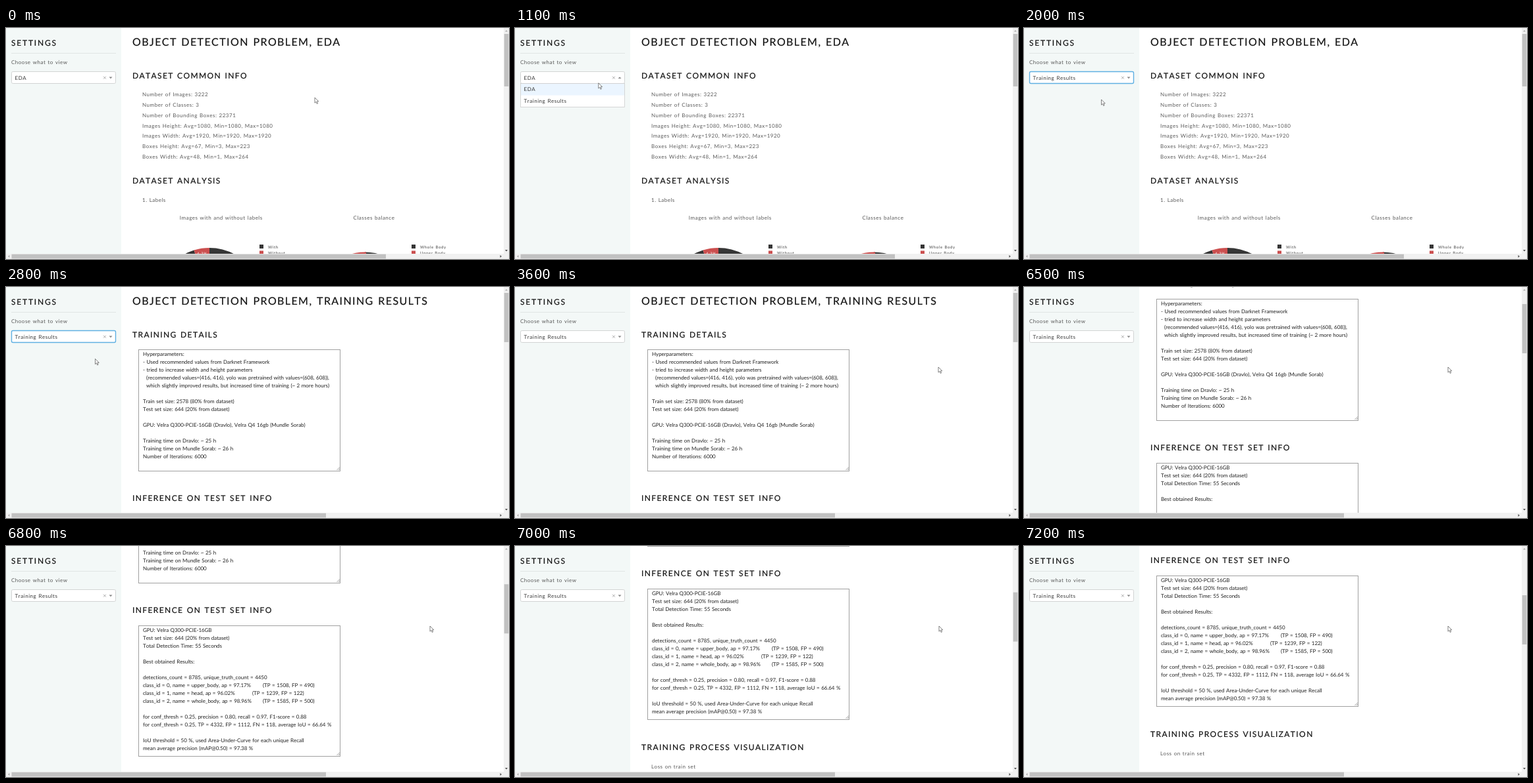
Animation of 764 by 352 pixels, one loop 8000 ms. Source, as an HTML page:

```html
<!DOCTYPE html>
<html lang="en">
<head>
<meta charset="utf-8">
<title>Object detection dashboard</title>
<style>
  html, body { margin: 0; width: 100%; height: 100%; overflow: hidden; background: #fff; }
  svg { display: block; }
  text {
    font: 8px Lato, "Open Sans", sans-serif;
    white-space: pre;
    text-rendering: geometricPrecision;
    font-kerning: none;
    word-spacing: .07em;
  }
  .h1, .h2 { fill: #141414; stroke: #141414; stroke-width: .2px; }
  .h1 { font-size: 16px; letter-spacing: 1.41px; }
  .h2 { font-size: 12px; letter-spacing: 1.4px; }
  .side { letter-spacing: 1.8px; }
  .body { letter-spacing: .5px; fill: #5a5a5a; }
  .value { letter-spacing: .53px; fill: #383838; }
  .legend { font-size: 6px; letter-spacing: .65px; fill: #444; }
  .area { letter-spacing: -.05px; fill: #222; }
  .mid { text-anchor: middle; }
</style>
</head>
<body>
<svg id="stage" width="764" height="352" viewBox="0 0 764 352"></svg>
<script>
const DURATION = 8000, STEP = 100;
const DARK = '#363636', RED = '#cb4f4f';

const text = (cls, x, y, str) => `<text class="${cls}" x="${x}" y="${y}">${str}</text>`;
const rect = (x, y, w, h, fill, extra = '') =>
  `<rect x="${x}" y="${y}" width="${w}" height="${h}" fill="${fill}" ${extra}/>`;
const path = (d, fill, extra = '') => `<path d="${d}" fill="${fill}" ${extra}/>`;
const lines = (cls, x, y, pitch, list) =>
  list.map((str, i) => str && text(cls, x, y + i * pitch, str)).join('');

// Pie slice; angles in degrees, clockwise from the top
function slice(cx, cy, r, from, to, fill) {
  const point = a => {
    const rad = a * Math.PI / 180;
    return `${cx + r * Math.sin(rad)} ${cy - r * Math.cos(rad)}`;
  };
  return path(`M${cx} ${cy}L${point(from)}A${r} ${r} 0 ${+(to - from > 180)} 1 ${point(to)}Z`, fill);
}

function textarea(y, h, list) {
  const bottom = y + h;
  return rect(201.5, y + .5, 306, h, '#fff', 'stroke="#a0a0a0"')
    + lines('area', 208, y + 10.4, 12, list)
    + path(`M502.5 ${bottom - 1}l4.5-4.5M505 ${bottom - 1}l2-2`, 'none', 'stroke="#777" stroke-width=".7"');
}

function legend(x, names) {
  return names.map((name, i) =>
    rect(x, 330 + i * 9.5, 6, 6, i ? RED : DARK) + text('legend', x + 13, 335.6 + i * 9.5, name)).join('');
}

const edaPage =
  text('h1', 192, 26.5, 'OBJECT DETECTION PROBLEM, EDA')
  + text('h2', 192, 76.6, 'DATASET COMMON INFO')
  + lines('body', 207, 104, 15.87, [
    'Number of Images: 3222',
    'Number of Classes: 3',
    'Number of Bounding Boxes: 22371',
    'Images Height: Avg=1080, Min=1080, Max=1080',
    'Images Width: Avg=1920, Min=1920, Max=1920',
    'Boxes Height: Avg=67, Min=3, Max=223',
    'Boxes Width: Avg=48, Min=1, Max=264'])
  + text('h2', 192, 237, 'DATASET ANALYSIS')
  + text('body', 207, 264.8, '1. Labels')
  + text('body mid', 326.8, 292.3, 'Images with and without labels')
  + text('body mid', 559, 292.3, 'Classes balance')
  + slice(309, 415, 80, 0, 343, DARK) + slice(309, 415, 80, 343, 360, RED)
  + '<text class="legend mid" x="298" y="346" style="fill:#fff">4.7%</text>'
  + slice(545, 421.5, 80, 0, 180, DARK) + slice(545, 421.5, 80, 180, 361.5, RED)
  + legend(385, ['With', 'Without'])
  + legend(616, ['Whole Body', 'Upper Body']);

const trainingPage =
  text('h1', 192, 26.5, 'OBJECT DETECTION PROBLEM, TRAINING RESULTS')
  + text('h2', 192, 76.6, 'TRAINING DETAILS')
  + textarea(95, 185, [
    'Hyperparameters:',
    '- Used recommended values from Darknet Framework',
    '- tried to increase width and height parameters',
    '  (recommended values=(416, 416), yolo was pretrained with values=(608, 608)),',
    '  which slightly improved results, but increased time of training (~ 2 more hours)',
    '',
    'Train set size: 2578 (80% from dataset)',
    'Test set size: 644 (20% from dataset)',
    '',
    'GPU: Velra Q300-PCIE-16GB (Dravlo), Velra Q4 16gb (Mundle Sorab)',
    '',
    'Training time on Dravlo: ~ 25 h',
    'Training time on Mundle Sorab: ~ 26 h',
    'Number of Iterations: 6000'])
  + text('h2', 192, 326.3, 'INFERENCE ON TEST SET INFO')
  + textarea(345, 199, [
    'GPU: Velra Q300-PCIE-16GB',
    'Test set size: 644 (20% from dataset)',
    'Total Detection Time: 55 Seconds',
    '',
    'Best obtained Results:',
    '',
    'detections_count = 8785, unique_truth_count = 4450',
    'class_id = 0, name = upper_body, ap = 97.17%',
    'class_id = 1, name = head, ap = 96.02%',
    'class_id = 2, name = whole_body, ap = 98.96%',
    '',
    'for conf_thresh = 0.25, precision = 0.80, recall = 0.97, F1-score = 0.88',
    'for conf_thresh = 0.25, TP = 4332, FP = 1112, FN = 118, average IoU = 66.64 %',
    '',
    'IoU threshold = 50 %, used Area-Under-Curve for each unique Recall',
    'mean average precision (mAP@0.50) = 97.38 %'])
  + text('area', 390, 439.4, '(TP = 1508, FP = 490)')
  + text('area', 374, 451.4, '(TP = 1239, FP = 122)')
  + text('area', 390, 463.4, '(TP = 1585, FP = 500)')
  + text('h2', 192, 591.2, 'TRAINING PROCESS VISUALIZATION')
  + text('body', 207, 618.8, 'Loss on train set');

const sidebar =
  rect(0, 0, 175, 344, '#f3f8f7')
  + text('h2 side', 8, 27.2, 'SETTINGS')
  + rect(8, 38, 159, 1, '#e0e5e4')
  + text('body', 8, 55.2, 'Choose what to view')
  + rect(8.5, 66.5, 158, 18, '#fff', 'id="field" rx="2"')
  + '<text id="value" class="value" x="13.5" y="78.6"></text>'
  + path('M148 73.8l3.8 3.8m0-3.8l-3.8 3.8', 'none', 'stroke="#999" stroke-width=".8"')
  + '<path id="arrow" fill="#888"/>'
  + `<g id="menu">${rect(8.5, 84.5, 158, 36, '#fff', 'stroke="#ccc" stroke-width=".8"')}
      <rect id="hover" x="9" width="157" height="17.6" fill="#ebf5ff"/>
      ${text('value', 13.5, 96.4, 'EDA')}${text('value', 13.5, 114.2, 'Training Results')}</g>`;

const scrollbars =
  rect(756, 0, 8, 352, '#f1f1f1') + rect(0, 344, 764, 8, '#f1f1f1')
  + '<rect id="vThumb" x="756.7" width="6.6" fill="#c1c1c1"/>'
  + '<rect id="hThumb" x="8.5" y="344.7" height="6.6" fill="#c1c1c1"/>'
  + path('M758 5.6l2-2.4 2 2.4z', '#aaa')
  + path('M758 338l2 2.4 2-2.4zM750.5 346l2.4 2-2.4 2z', '#505050')
  + path('M5.4 346L3 348l2.4 2z', '#aaa');

const stage = document.getElementById('stage');
stage.innerHTML =
  `<g id="eda">${edaPage}</g><g id="training">${trainingPage}</g>${sidebar}${scrollbars}`
  + path('M0 0V8.2L1.9 6.4 3.2 9.5 4.6 8.9 3.3 5.9H5.8Z', '#fff',
    'id="cursor" stroke="#505050" stroke-width=".7" stroke-linejoin="round"');

const el = Object.fromEntries([...stage.querySelectorAll('[id]')].map(node => [node.id, node]));
const set = (node, attrs) => Object.entries(attrs).forEach(([k, v]) => node.setAttribute(k, v));
const show = (node, on) => { node.style.display = on ? '' : 'none'; };

// Pointer stops: time, x, y
const stops = [
  [0, 469, 106], [100, 469, 106], [300, 181, 110], [700, 130, 75], [900, 130, 75], [1500, 117.5, 109],
  [2700, 117.5, 109], [3600, 643, 122], [4600, 643, 122], [4700, 644, 122], [DURATION, 644, 122]];

function pointerAt(t) {
  const i = stops.findIndex(stop => stop[0] > t);
  const [t0, x0, y0] = stops[i - 1], [t1, x1, y1] = stops[i];
  const u = (t - t0) / (t1 - t0), k = u * u * (3 - 2 * u);
  return { x: x0 + (x1 - x0) * k, y: y0 + (y1 - y0) * k };
}

function scrollAt(t) {
  const u = Math.min(1, Math.max(0, (t - 6384) / 816));
  return Math.round(300 * (1 - (1 - u) ** 1.93));
}

function render(t) {
  const pointer = pointerAt(t), scroll = scrollAt(t);
  const open = t >= 700 && t < 1900;
  const chosen = t >= 1900;
  const focused = chosen && t < 3500;
  const loaded = t >= 2800;

  show(el.eda, !loaded);
  show(el.training, loaded);
  set(el.training, { transform: `translate(0 ${-scroll})` });

  el.value.textContent = chosen ? 'Training Results' : 'EDA';
  set(el.field, { stroke: focused ? '#5fb0e2' : '#d2d4d4', 'stroke-width': focused ? 1.4 : 1 });
  set(el.arrow, { d: open ? 'M156.5 77h5l-2.5-2.6z' : 'M156.5 74.6h5l-2.5 2.6z' });
  show(el.menu, open);
  set(el.hover, { y: pointer.y > 102 ? 102.6 : 85 });

  set(el.vThumb, { y: 9 + scroll * .22, height: loaded ? 75 : 80 });
  set(el.hThumb, { width: loaded ? 477.5 : 568.5 });
  show(el.cursor, t < 100 || t >= 300);
  set(el.cursor, { transform: `translate(${pointer.x} ${pointer.y})` });
}

function tick() {
  render(Math.floor(performance.now() % DURATION / STEP) * STEP);
  requestAnimationFrame(tick);
}
tick();
</script>
</body>
</html>
```
